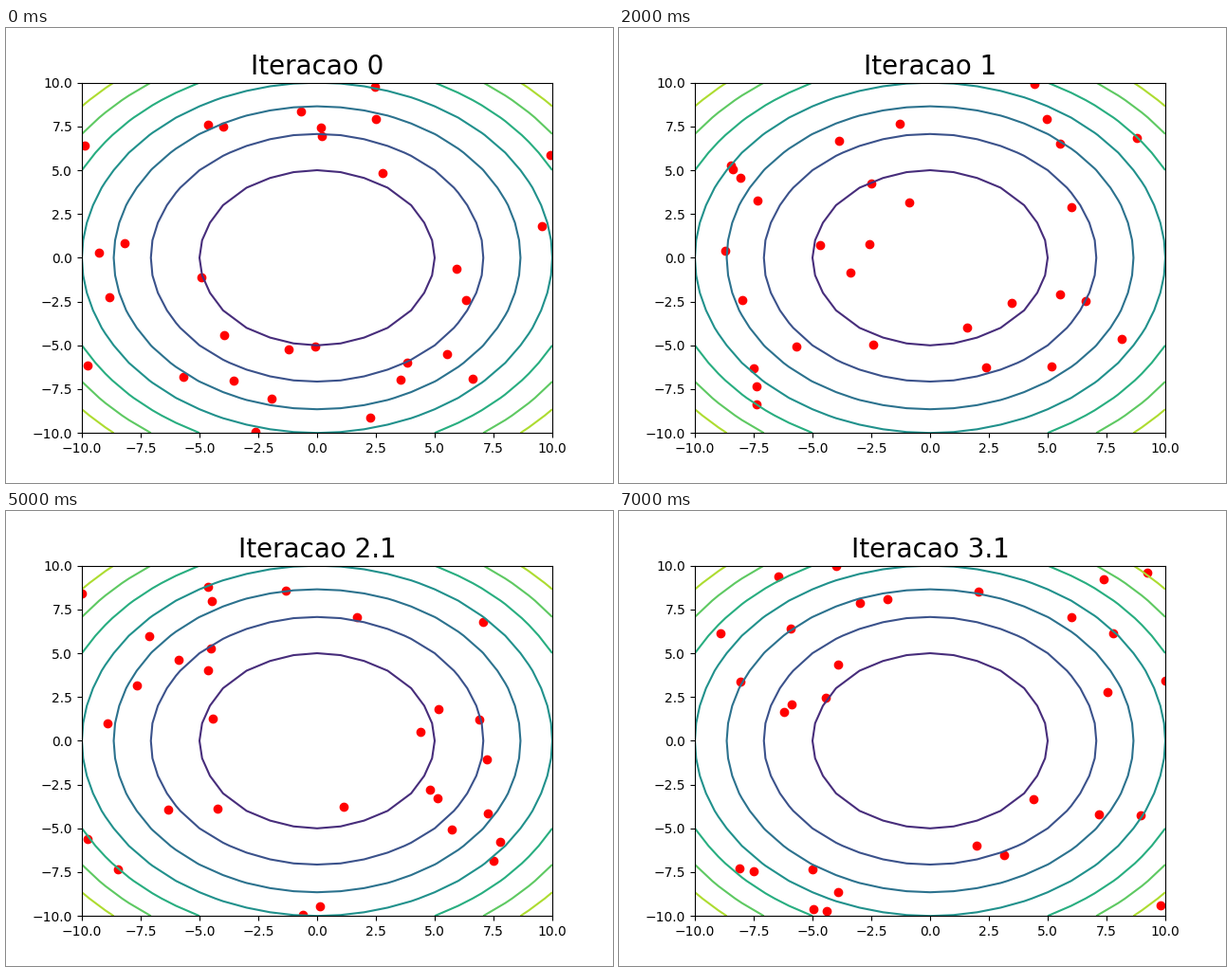
A matplotlib script for the animation above (8000 ms loop, 640 by 480 pixels).

```python
import numpy as np
import matplotlib.pyplot as plt
from matplotlib.animation import FuncAnimation

COUNT = 30
LIMIT = 10
INNER_RADIUS = (4, 2, 1, 5)  # empty disc in the middle, per iteration


def scatter_swarm(rng, inner):
    """Spread particles evenly over the square, outside the inner disc."""
    points = rng.uniform(-LIMIT, LIMIT, (4 * COUNT, 2))
    return points[np.hypot(*points.T) > inner][:COUNT]


def nudge(rng, points):
    """Shift about half of the particles, mostly along a single axis."""
    chosen = rng.random(points.shape) < 0.25
    step = rng.normal(0, 2, points.shape)
    return np.clip(points + chosen * step, -LIMIT, LIMIT)


def build_states():
    """Two states per iteration; the first iteration stays still."""
    rng = np.random.default_rng(7)
    states = []
    for iteration, inner in enumerate(INNER_RADIUS):
        swarm = scatter_swarm(rng, inner)
        moved = nudge(rng, swarm) if iteration else swarm
        states += [(f"Iteracao {iteration}", swarm),
                   (f"Iteracao {iteration}.1", moved)]
    return states


states = build_states()
fig, ax = plt.subplots(figsize=(6.4, 4.8), dpi=100)
grid = np.arange(-LIMIT, LIMIT + 1)
X, Y = np.meshgrid(grid, grid)
ax.contour(X, Y, X**2 + Y**2, zorder=2)
dots = ax.scatter([], [], color="red", zorder=1)
ax.set(xlim=(-LIMIT, LIMIT), ylim=(-LIMIT, LIMIT))
title = ax.set_title("", fontsize=20)


def update(frame):
    label, swarm = states[frame]
    title.set_text(label)
    dots.set_offsets(swarm)
    return dots, title


anim = FuncAnimation(fig, update, frames=len(states), interval=1000, repeat=True)
plt.show()
```
